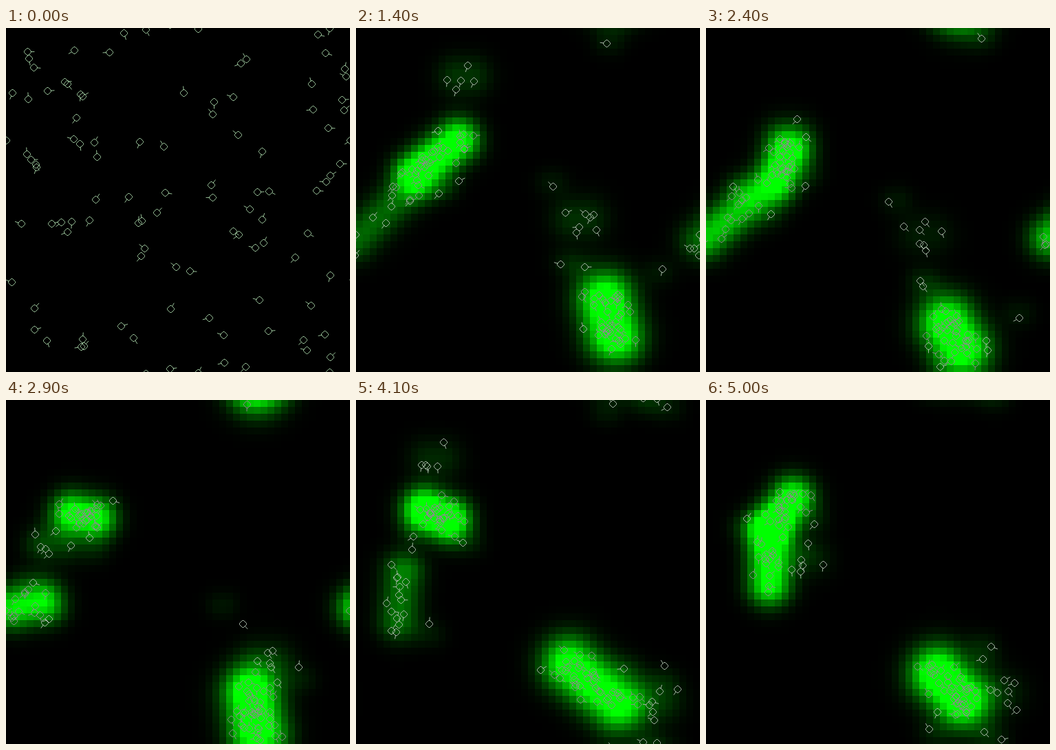
These frames come from a looping animation (500x500 px, 5.1 s). An HTML page with a canvas:

```html
<!DOCTYPE html>
<html lang="en">
<head>
<meta charset="utf-8">
<title>Swarm and trail</title>
<style>
html, body { margin: 0; width: 100%; height: 100%; overflow: hidden; background: #000; }
canvas { display: block; }
</style>
</head>
<body>
<canvas id="stage" width="500" height="500"></canvas>
<script>
const SIZE = 500, CELL = 10, STEP = 100, FRAMES = 51, TURN = 2 * Math.PI;
const KEYS = [600, 1400, 2400, 3400, 4100, 5000];
const ctx = document.getElementById('stage').getContext('2d');

// Glowing segments, one pose per key time: x1, y1, x2, y2, strength.
const upperLeft = {
  count: 26, width: 20,
  poses: [
    [75, 203, 68, 240, 1.4], [88, 212, 148, 163, 1.25], [99, 225, 120, 180, 1.25],
    [95, 105, 138, 163, 1.1], [100, 160, 134, 174, 1.6], [126, 143, 98, 182, 1.25]
  ]
};
const lowerLeft = {
  count: 14, width: 20,
  poses: [
    [88, 182, 138, 125, .4], [75, 235, 0, 308, .4], [0, 305, 60, 255, .8],
    [25, 298, 45, 330, 1.15], [68, 250, 62, 320, .45], [90, 195, 92, 268, 1.1]
  ]
};
const lowerRight = {
  count: 38, width: 26,
  poses: [
    [350, 430, 372, 432, 1.3], [362, 395, 375, 445, 1.35], [350, 430, 372, 465, 1.35],
    [362, 425, 358, 490, 1.35], [310, 384, 380, 441, 1.2], [337, 398, 372, 435, 1.4]
  ]
};

// Smaller round glows: x, y, strength.
const round = ([x, y, power]) => [x - 10, y, x + 10, y, power];
const upperRight = {
  count: 7, width: 22,
  poses: [
    [318, 248, .7], [325, 277, .18], [318, 300, .1],
    [438, 464, .3], [435, 437, .18], [425, 425, .12]
  ].map(round)
};
const drifter = {
  count: 5, width: 20,
  poses: [
    [40, 32, .35], [157, 70, .2], [120, 158, .2],
    [25, 255, .25], [115, 85, .15], [145, 230, .12]
  ].map(round)
};
const trails = [upperLeft, lowerLeft, lowerRight, upperRight, drifter];

let seed = 41;
const random = () => {
  seed = (seed * 1664525 + 1013904223) % 4294967296;
  return seed / 4294967296;
};
const spread = () => random() + random() + random() - 1.5;
const mix = (a, b, f) => a + (b - a) * f;
const mod = v => ((v % SIZE) + SIZE) % SIZE;
const wrap = d => d - SIZE * Math.round(d / SIZE);

function poseOf(trail, t) {
  let i = 0;
  while (i < KEYS.length - 2 && t > KEYS[i + 1]) i++;
  const f = Math.max(0, (t - KEYS[i]) / (KEYS[i + 1] - KEYS[i]));
  const pose = trail.poses[i].map((v, n) => mix(v, trail.poses[i + 1][n], f));
  pose[4] *= Math.min(1, t / KEYS[0]);
  return [...pose, trail.width];
}

const agents = [];
for (const trail of trails) {
  for (let n = 0; n < trail.count; n++) {
    agents.push({ trail, along: random() * TURN, dx: spread() * 1.1, dy: spread() * 1.1 });
  }
}
// A few loners circle well outside the clusters.
while (agents.length < 100) {
  const angle = random() * TURN, reach = 2 + random() * 1.5;
  agents.push({
    trail: trails[agents.length % 4], along: random() * TURN, loner: true,
    dx: reach * Math.cos(angle), dy: reach * Math.sin(angle)
  });
}
for (const a of agents) {
  a.phase = random() * TURN;
  a.rate = (3 + random() * 4) / 1000;
}

function roam(a, t) {
  const [x1, y1, x2, y2, , width] = poseOf(a.trail, t);
  const along = .5 + .55 * Math.sin(a.along + a.rate * t * .6);
  const swing = a.phase + a.rate * t;
  return [
    mix(x1, x2, along) + width * (a.dx + .3 * Math.cos(swing)),
    mix(y1, y2, along) + width * (a.dy + .3 * Math.sin(swing))
  ];
}

// Every agent begins at the closest free place of a random scatter.
const starts = agents.map(() => [random() * SIZE, random() * SIZE]);
for (const a of [...agents].reverse()) {
  const [x, y] = roam(a, KEYS[0]);
  const far = p => Math.hypot(wrap(p[0] - x), wrap(p[1] - y));
  const best = starts.reduce((m, p, i) => far(p) < far(starts[m]) ? i : m, 0);
  a.start = starts.splice(best, 1)[0];
}

function place(a, t) {
  if (t >= KEYS[0]) return roam(a, t);
  const goal = roam(a, KEYS[0]);
  return a.start.map((v, n) => v + wrap(goal[n] - v) * t / KEYS[0]);
}

function glow(poses, x, y) {
  let sum = 0;
  for (const [x1, y1, x2, y2, power, width] of poses) {
    const vx = x2 - x1, vy = y2 - y1;
    const px = wrap(x - (x1 + x2) / 2), py = wrap(y - (y1 + y2) / 2);
    const k = Math.max(-.5, Math.min(.5, (px * vx + py * vy) / (vx * vx + vy * vy)));
    const qx = px - k * vx, qy = py - k * vy;
    sum += power * Math.exp(-(qx * qx + qy * qy) / (2 * width * width));
  }
  return Math.min(1, sum);
}

// Loners leave a faint glow a little behind themselves.
function wake(a, t) {
  const [x, y] = place(a, Math.max(0, t - 150));
  return [x - 4, y, x + 4, y, .08 * Math.min(1, t / KEYS[0]), 14];
}

function drawAgent(x, y, angle) {
  const c = Math.cos(angle), s = Math.sin(angle);
  ctx.beginPath();
  for (let n = 0; n < 8; n++) {
    const corner = Math.floor(n / 2) * TURN / 4 + (n % 2 ? .2 : -.2);
    ctx.lineTo(x + 5.1 * Math.cos(corner), y + 5.1 * Math.sin(corner));
  }
  ctx.closePath();
  ctx.moveTo(x + 4 * c, y + 4 * s);
  ctx.lineTo(x + 10 * c, y + 10 * s);
  ctx.stroke();
}

function draw(t) {
  const poses = [
    ...trails.map(trail => poseOf(trail, t)),
    ...agents.filter(a => a.loner).map(a => wake(a, t))
  ];
  for (let y = 0; y < SIZE; y += CELL) {
    for (let x = 0; x < SIZE; x += CELL) {
      const level = glow(poses, x + CELL / 2, y + CELL / 2);
      ctx.fillStyle = `rgb(0,${Math.round(255 * level)},0)`;
      ctx.fillRect(x, y, CELL, CELL);
    }
  }
  ctx.lineWidth = 1;
  for (const a of agents) {
    const here = place(a, t), next = place(a, t + 40);
    const angle = t ? Math.atan2(next[1] - here[1], next[0] - here[0]) : a.phase;
    const x = Math.round(mod(here[0])) + .5, y = Math.round(mod(here[1])) + .5;
    ctx.strokeStyle = glow(poses, x, y) > .5 ? '#8c8c8c' : t ? '#a8b8a8' : '#98c098';
    for (const ox of [-SIZE, 0, SIZE]) {
      for (const oy of [-SIZE, 0, SIZE]) {
        const near = Math.max(Math.abs(x + ox - SIZE / 2), Math.abs(y + oy - SIZE / 2));
        if (near < SIZE / 2 + 12) drawAgent(x + ox, y + oy, angle);
      }
    }
  }
}

const origin = performance.now();
let shown = -1;
function tick() {
  const frame = Math.floor((performance.now() - origin) / STEP) % FRAMES;
  if (frame !== shown) draw((shown = frame) * STEP);
  requestAnimationFrame(tick);
}
tick();
</script>
</body>
</html>
```
